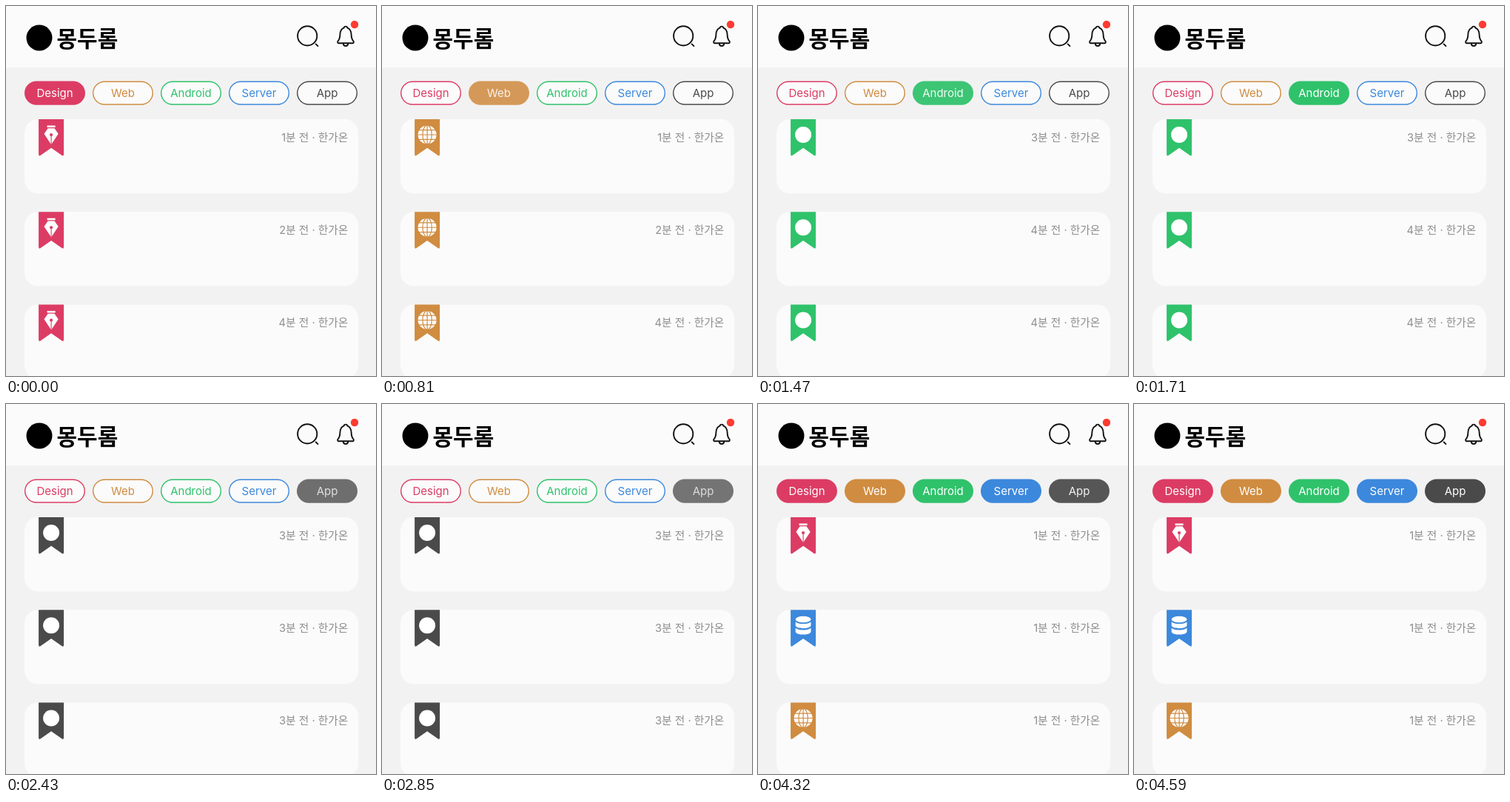
Recreate the animation shown at these times as an HTML page. Size 500 by 500 pixels, loop 4.62 s.

```html
<!DOCTYPE html>
<html lang="ko">
<head>
<meta charset="utf-8">
<title>Category filter</title>
<style>
  html, body { margin: 0; width: 100%; height: 100%; overflow: hidden; background: #f2f2f2; }
  svg { display: block; width: 100%; height: 100%; }
  text { font-family: Inter, "Noto Sans CJK KR", sans-serif; font-size: 15px; }
  .meta { font-size: 14.7px; fill: #8e8e8e; text-anchor: end; }
  .logo { font-family: "Noto Sans CJK KR", sans-serif; font-size: 30px; font-weight: 900; }
  .line { fill: none; stroke: #111; stroke-width: 1.9; stroke-linecap: round; stroke-linejoin: round; }
</style>
</head>
<body>
<svg id="stage" viewBox="0 0 500 500">
  <defs>
    <!-- Icons are centred on the origin; currentColor is the ribbon colour. -->
    <g id="pen">
      <path fill="#fff" d="M-5.5-12.5h11v2.4h-11zM-4.4-8.8h8.8L9.6-1.2 0 13.2-9.6-1.2z"/>
      <circle r="2.1" fill="currentColor"/>
      <path d="M0 0V13" stroke="currentColor" stroke-width="1.1"/>
    </g>
    <g id="globe">
      <circle r="12.5" fill="#fff"/>
      <g fill="none" stroke="currentColor" stroke-width="1.2">
        <ellipse rx="6.2" ry="12.8"/>
        <path d="M0-13V13M-13 0H13M-12-6.3H12M-12 6.3H12"/>
      </g>
    </g>
    <g id="database" fill="#fff">
      <ellipse cy="-8.2" rx="10.4" ry="4.3"/>
      <path id="layer" d="M-10.4-4.8C-7-1.4 7-1.4 10.4-4.8V0C9 5.2-9 5.2-10.4 0z"/>
      <use href="#layer" y="8.4"/>
    </g>
    <circle id="disc" r="11" fill="#fff"/>
  </defs>

  <rect width="500" height="83" fill="#fbfbfb"/>
  <circle cx="45" cy="43" r="17.5"/>
  <text class="logo" x="68.5" y="54.5">몽두롬</text>
  <g class="line">
    <circle cx="407.2" cy="40.4" r="13.1"/>
    <path d="M418.6 51.4l2.8 2.8"/>
    <path d="M449.5 50.2C447.9 50.2 447.8 48.4 448.8 47.2C451 44.8 451.2 43 451.4 38.5C451.6 33.5 453.8 30.6 456.6 29.6C457 26.9 461 26.9 461.4 29.6C464.2 30.6 466.4 33.5 466.6 38.5C466.8 43 467 44.8 469.2 47.2C470.2 48.4 470.1 50.2 468.5 50.2Z"/>
    <path d="M455.8 51C456 55 462 55 462.2 51"/>
  </g>
  <circle cx="471" cy="25" r="5.2" fill="#ff3b30"/>
</svg>

<script>
const LOOP = 4620, FADE = 470, PRESSED = 0.75;
const AUTHOR = '한가온';

const tabs = [
  { label: 'Design',  color: '#dc3c64', icon: 'pen' },
  { label: 'Web',     color: '#d08c40', icon: 'globe' },
  { label: 'Android', color: '#2fc26b', icon: 'disc' },
  { label: 'Server',  color: '#3c88dc', icon: 'database' },
  { label: 'App',     color: '#4a4a4a', icon: 'disc' },
];

// rows: tab index of each card; tapped: the chip fading back since `release`
const states = [
  { at: 0,    rows: [0, 0, 0], minutes: [1, 2, 4] },
  { at: 720,  rows: [1, 1, 1], minutes: [1, 2, 4], tapped: 1, release: 690 },
  { at: 1260, rows: [2, 2, 2], minutes: [3, 4, 4], tapped: 2, release: 1250 },
  { at: 2430, rows: [4, 4, 4], minutes: [3, 3, 3], tapped: 4, release: 2400 },
  { at: 2850, rows: [4, 4, 4], minutes: [3, 3, 3], tapped: 4, release: Infinity },
  { at: 4110, rows: [0, 3, 1], minutes: [1, 1, 1], tapped: 4, release: 4110, all: true },
];

const stage = document.getElementById('stage');

function add(parent, name, attrs = {}, text = '') {
  const node = document.createElementNS('http://www.w3.org/2000/svg', name);
  for (const key in attrs) node.setAttribute(key, attrs[key]);
  node.textContent = text;
  return parent.appendChild(node);
}

const chips = tabs.map(({ label, color }, i) => {
  const group = add(stage, 'g', { transform: `translate(${25 + 92 * i} 101.8)` });
  const box = add(group, 'rect', {
    x: 0.7, y: 0.4, width: 80.6, height: 30.8, rx: 15.4, stroke: color, 'stroke-width': 1.4,
  });
  const text = add(group, 'text', { x: 41, y: 21.4, 'text-anchor': 'middle' }, label);
  return { box, text };
});

const cards = [0, 1, 2].map(i => {
  const group = add(stage, 'g', { transform: `translate(25 ${153 + 125.25 * i})` });
  add(group, 'rect', { width: 451, height: 100.3, rx: 18, fill: '#fbfbfb' });
  const ribbon = add(group, 'g', { transform: 'translate(36.1 0)' });
  add(ribbon, 'path', {
    fill: 'currentColor',
    d: 'M-17 0H17V47.3Q17 50.6 14.3 48.8L0 38.7L-14.3 48.8Q-17 50.6-17 47.3Z',
  });
  const icon = add(ribbon, 'use', { y: 21 });
  const text = add(group, 'text', { class: 'meta', x: 437.3, y: 29.8 });
  return { ribbon, icon, text };
});

function chipOpacity(state, time) {
  const progress = Math.min(1, Math.max(0, (time - state.release) / FADE));
  return 1 - (1 - PRESSED) * (1 - progress) ** 2;
}

function draw(time) {
  const state = states.findLast(s => s.at <= time);
  chips.forEach(({ box, text }, i) => {
    const { color } = tabs[i];
    const selected = state.all || state.rows[0] === i;
    const opacity = state.tapped === i ? chipOpacity(state, time) : 1;
    box.setAttribute('fill', selected ? color : '#fbfbfb');
    text.setAttribute('fill', selected ? '#fff' : color);
    box.setAttribute('opacity', opacity);
    text.setAttribute('opacity', opacity);
  });
  cards.forEach(({ ribbon, icon, text }, i) => {
    const tab = tabs[state.rows[i]];
    ribbon.setAttribute('color', tab.color);
    icon.setAttribute('href', '#' + tab.icon);
    text.textContent = `${state.minutes[i]}분 전 · ${AUTHOR}`;
  });
}

const start = performance.now();
function tick() {
  draw((performance.now() - start) % LOOP);
  requestAnimationFrame(tick);
}
tick();
</script>
</body>
</html>
```
